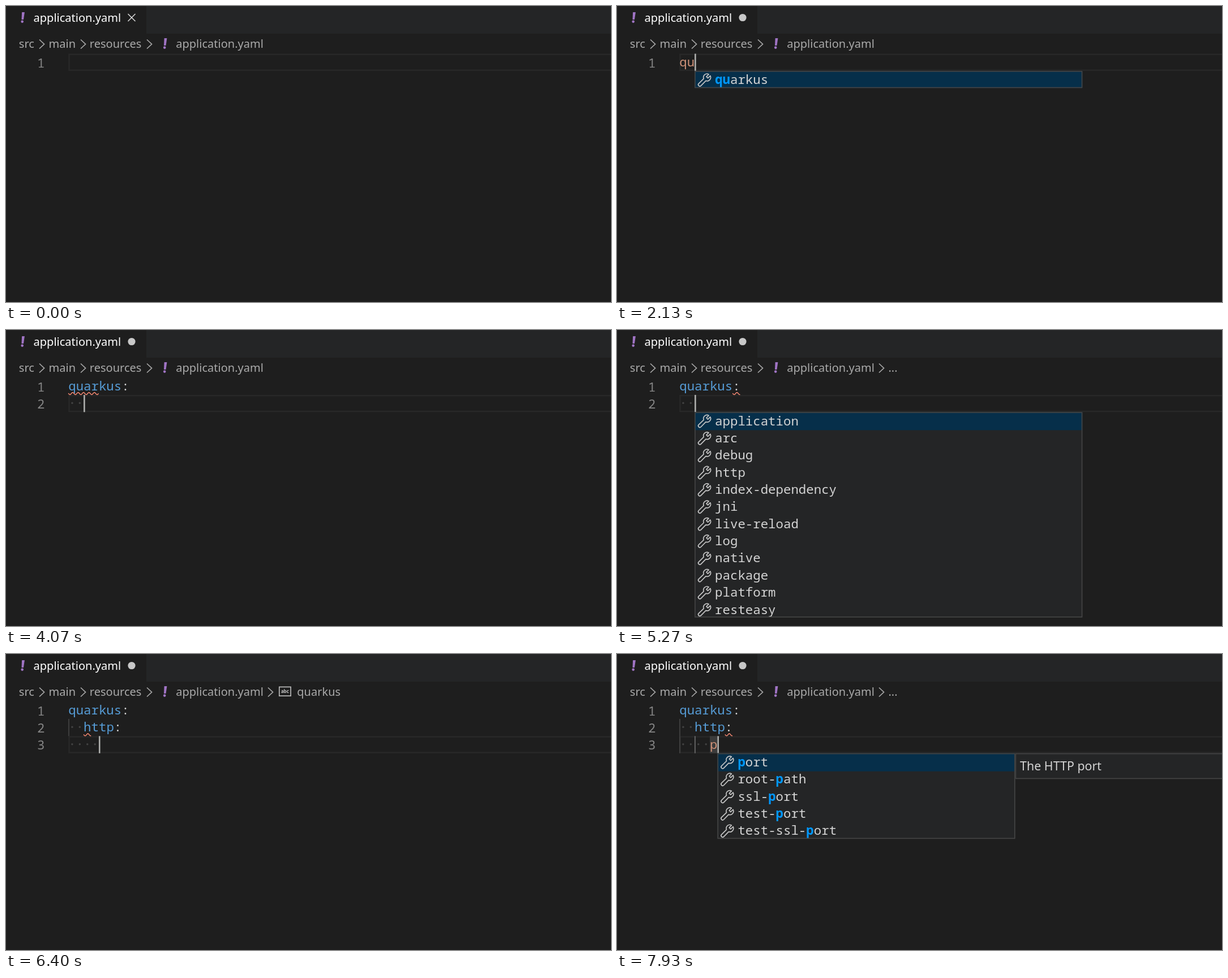
These frames come from a looping animation (1069 px wide and 524 px high, 8 s). An HTML page with a canvas:

```html
<!DOCTYPE html>
<html lang="en">
<head>
<meta charset="utf-8">
<title>YAML completion</title>
<style>
  html, body { margin: 0; width: 100%; height: 100%; overflow: hidden; background: #1e1e1e; }
  canvas { display: block; }
</style>
</head>
<body>
<canvas id="stage" width="1069" height="524"></canvas>
<script>
const ctx = document.getElementById('stage').getContext('2d');
const LOOP = 8000;
const CHAR = 13.44, ROW = 30.4, LEFT = 110.2, TOP = 84.5;
const MONO = '22.4px "Noto Sans Mono", monospace';
const UI = '20.05px "Noto Sans", sans-serif';
const DOCS = '21.4px "Noto Sans", sans-serif';
const PANEL = '#242526', BORDER = '#454545', TEXT = '#d4d4d4', CRUMB = '#a9a9a9';
const WRENCH = new Path2D('M19.5 1.8A6.3 6.3 0 0 0 10.6 9.6L1.8 18.2A2.7 2.7 0 0 0 5.8 22' +
  'L14.4 13.2A6.3 6.3 0 0 0 22.2 4.4L18 8.6L15.4 6Z');

const QUARKUS = 'application arc debug http index-dependency jni live-reload log native package platform resteasy'.split(' ');
const HTTP = 'auth body cors host io-threads limits port root-path ssl ssl-port test-port test-ssl-port'.split(' ');
const PORTS = HTTP.filter(name => /\bp/.test(name));

// Squiggles are [line, first column, end column].
const START = { lines: [''], caret: false, dirty: false, items: null, query: '', squiggle: null, crumb: '' };
const typed = (lines, query, items) => ({ lines, query, items, caret: true });
const STEPS = [
  [1130, { caret: true }],
  [1600, { caret: false }],
  [2000, { ...typed(['q'], 'q', null), dirty: true }],
  [2130, typed(['qu'], 'qu', ['quarkus'])],
  [2200, typed(['qua'], 'qua', ['quarkus'])],
  [2330, { ...typed(['quar'], 'quar', ['quarkus']), squiggle: [0, 0, 1] }],
  [2730, { squiggle: [0, 0, 4] }],
  [2800, { caret: false }],
  [3330, { caret: true }],
  [3800, { caret: false }],
  [4070, typed(['quarkus:', '  '], '', null)],
  [4330, { squiggle: [0, 7, 8] }],
  [4400, { crumb: '...' }],
  [4470, { caret: false }],
  [5000, { caret: true }],
  [5270, { items: QUARKUS }],
  [5470, { caret: false }],
  [5600, typed(['quarkus:', '  h'], 'h', ['http'])],
  [5730, typed(['quarkus:', '  ht'], 'ht', ['http'])],
  [5800, typed(['quarkus:', '  htt'], 'htt', ['http'])],
  [5930, typed(['quarkus:', '  http'], 'http', ['http'])],
  [6000, { squiggle: [1, 2, 3] }],
  [6330, typed(['quarkus:', '  http:', '    '], '', null)],
  [6400, { crumb: 'quarkus' }],
  [6730, { squiggle: [1, 6, 7] }],
  [6800, { crumb: '...' }],
  [6870, { caret: false }],
  [7330, { caret: true }],
  [7470, { items: HTTP }],
  [7930, typed(['quarkus:', '  http:', '    p'], 'p', PORTS)]
];

const lineTop = line => TOP + line * ROW;
const columnX = column => LEFT + column * CHAR;

function fill(x, y, w, h, color) {
  ctx.fillStyle = color;
  ctx.fillRect(x, y, w, h);
}

function frame(x, y, w, h, color, width) {
  ctx.strokeStyle = color;
  ctx.lineWidth = width;
  ctx.strokeRect(x + width / 2, y + width / 2, w - width, h - width);
}

function text(str, x, y, color, font) {
  ctx.font = font;
  ctx.fillStyle = color;
  ctx.fillText(str, x, y);
}

function polyline(points, color, width) {
  ctx.beginPath();
  points.forEach(([x, y]) => ctx.lineTo(x, y));
  ctx.strokeStyle = color;
  ctx.lineWidth = width;
  ctx.stroke();
}

function disc(x, y, r, color) {
  ctx.beginPath();
  ctx.arc(x, y, r, 0, 2 * Math.PI);
  ctx.fillStyle = color;
  ctx.fill();
}

function yamlIcon(x, y) {
  ctx.beginPath();
  [[1.6, 0], [6.4, 0], [4.5, 13], [1, 13]].forEach(([dx, dy]) => ctx.lineTo(x + dx, y + dy));
  ctx.fillStyle = '#a074c4';
  ctx.fill();
  disc(x + 2.2, y + 16.6, 2.3, '#a074c4');
}

function chevron(x) {
  polyline([[x, 59.5], [x + 8.5, 67.5], [x, 75.5]], CRUMB, 1.7);
}

function drawHeader({ dirty, crumb }) {
  fill(248, 0, 821, 49, PANEL);
  yamlIcon(26.5, 11);
  text('application.yaml', 48.5, 27.5, '#fff', UI);
  if (dirty) {
    disc(222, 20.5, 6.6, '#c8c8c8');
  } else {
    polyline([[215.5, 14], [228.5, 27]], '#d8d8d8', 1.6);
    polyline([[228.5, 14], [215.5, 27]], '#d8d8d8', 1.6);
  }

  [['src', 22.8], ['main', 75.5], ['resources', 147.8], ['application.yaml', 300.2]]
    .forEach(([name, x]) => text(name, x, 74, CRUMB, UI));
  [59, 132, 249].forEach(chevron);
  yamlIcon(278, 57);
  if (!crumb) return;
  chevron(463);
  if (crumb === '...') {
    text(crumb, 479.5, 74, CRUMB, UI);
  } else {
    frame(482, 57.5, 22, 17.5, '#b8b8b8', 1.7);
    text('abc', 486, 68.5, '#c8c8c8', 'bold 8px "Noto Sans Mono", monospace');
    text(crumb, 514.3, 74, CRUMB, UI);
  }
}

function drawLine(str, line, current) {
  const top = lineTop(line), word = str.trim(), indent = str.length - str.trimStart().length;
  ctx.textAlign = 'right';
  text(line + 1, 68.5, top + 24, '#858585', MONO);
  ctx.textAlign = 'left';

  for (let col = 0; col < indent; col++) disc(columnX(col + 0.5), top + 14.4, 1.7, '#434343');
  if (!word) return;
  for (let col = 0; col < indent; col += 2) {
    const active = current && col === indent - 2;
    fill(columnX(col), top, 1.6, ROW, active ? '#707070' : '#464646');
  }
  const isKey = word.endsWith(':'), name = word.replace(':', '');
  if (indent && !isKey) fill(columnX(indent), top, word.length * CHAR, ROW, '#3b3b3b');
  text(name, columnX(indent), top + 22.3, isKey ? '#569cd6' : '#ce9178', MONO);
  if (isKey) text(':', columnX(indent + name.length), top + 22.3, TEXT, MONO);
}

function drawSquiggle([line, from, to]) {
  const points = [], width = (to - from) * CHAR;
  for (let x = 0; x <= width; x += 0.6) {
    const wave = Math.cos((x - 2.8) * 2 * Math.PI / 9.6);
    points.push([columnX(from) + x, lineTop(line) + 28 + 1.9 * wave]);
  }
  polyline(points, '#f48771', 1.5);
}

function drawPopup({ items, query }, x, y) {
  const hasDocs = items === PORTS;
  const width = hasDocs ? 526.2 : 685.3, height = items.length * 30.3;
  fill(x, y, width, height, PANEL);
  fill(x, y, width, Math.min(height, 32), '#062f4a');
  items.forEach((name, i) => {
    const top = y + 1 + i * 30.36, textX = x + 36;
    ctx.save();
    ctx.translate(x + 5.5, top + 3.2);
    ctx.strokeStyle = '#c5c5c5';
    ctx.lineWidth = 1.7;
    ctx.lineJoin = 'round';
    ctx.stroke(WRENCH);
    ctx.restore();

    const at = query ? name.search(new RegExp('\\b' + query)) : 0;
    const end = at + query.length;
    text(name.slice(0, at), textX, top + 22.3, TEXT, MONO);
    text(query, textX + at * CHAR, top + 22.3, '#0097fb', 'bold ' + MONO);
    text(name.slice(end), textX + end * CHAR, top + 22.3, TEXT, MONO);
  });
  frame(x, y, width, height, BORDER, 1.6);
  if (hasDocs) {
    const docsX = x + width;
    fill(docsX, y, 400, 45.5, PANEL);
    frame(docsX, y, 400, 45.5, BORDER, 1.6);
    text('The HTTP port', docsX + 8.5, y + 30, TEXT, DOCS);
  }
}

function draw(time) {
  const state = Object.assign({}, START, ...STEPS.filter(([at]) => at <= time).map(([, change]) => change));
  const line = state.lines.length - 1, top = lineTop(line);
  const caretX = columnX(state.lines[line].length);

  fill(0, 0, 1069, 524, '#1e1e1e');
  drawHeader(state);
  frame(LEFT, top, 1000, ROW, '#282828', 2.4);
  state.lines.forEach((str, i) => drawLine(str, i, i === line));
  if (state.squiggle) drawSquiggle(state.squiggle);
  if (state.caret) fill(caretX, top, 2.6, ROW, '#aeafad');
  if (state.items) drawPopup(state, caretX, top + ROW);
}

function tick() {
  draw(performance.now() % LOOP);
  requestAnimationFrame(tick);
}
tick();
</script>
</body>
</html>
```
